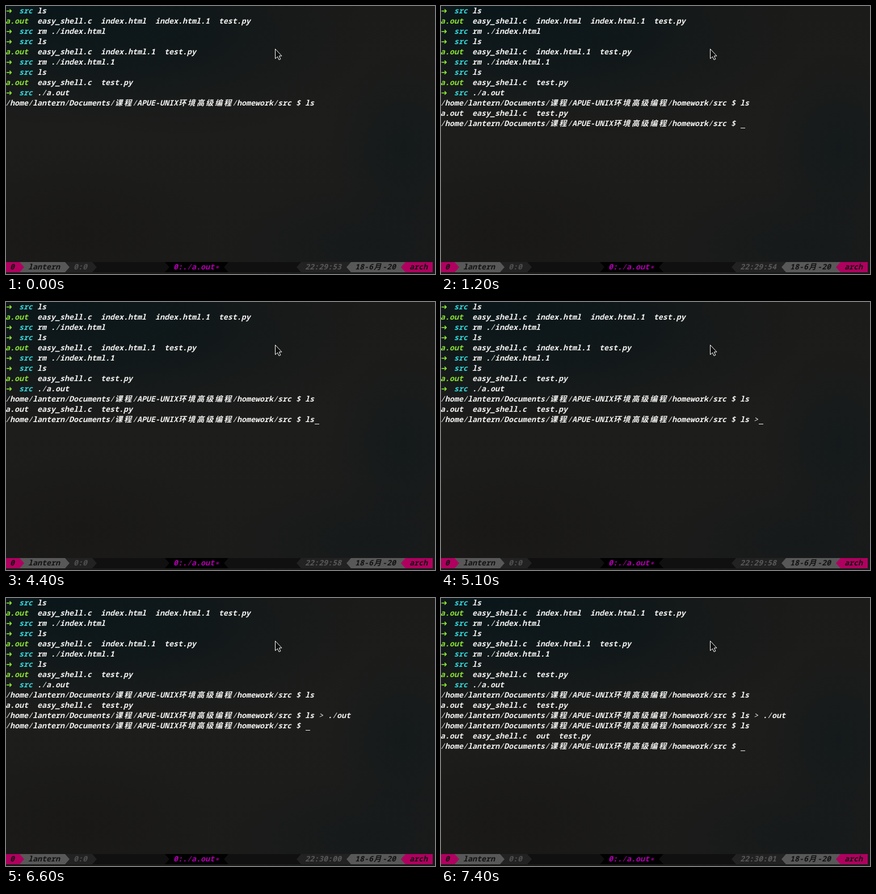
Animation, 756 px wide and 471 px high, one loop 8 s. Source, as an HTML page:

```html
<!DOCTYPE html>
<html lang="en">
<head>
<meta charset="utf-8">
<title>Terminal session</title>
<style>
  html, body { margin: 0; width: 100%; height: 100%; overflow: hidden; background: #1b1c1a; }
  body {
    background:
      radial-gradient(ellipse 380px 210px at 90px 0, #09161af0, #0b161900),
      radial-gradient(ellipse 330px 180px at 310px 50px, #0f1719c0, #0f171900),
      radial-gradient(ellipse 130px 170px at 700px 250px, #12191bd0, #12191b00),
      radial-gradient(ellipse 240px 110px at 640px 420px, #14191bc0, #14191b00),
      radial-gradient(ellipse 240px 130px at 130px 400px, #191817, #19181700),
      linear-gradient(#1b1b19, #1d1d1b 45%, #1b1b1a);
  }
  svg { display: block; width: 756px; height: 471px; }
  text {
    font: italic bold 13.3333px "Noto Sans Mono", "DejaVu Sans Mono", monospace;
    white-space: pre;
  }
  .thin { font-weight: 400; }
  .star { font-weight: 400; baseline-shift: -3px; }
  .mark { font-family: "DejaVu Sans", sans-serif; font-style: normal; }
  .han { font-family: "Noto Sans CJK SC", "Noto Sans CJK", sans-serif; }
</style>
</head>
<body>
<svg id="stage" viewBox="0 0 756 471"></svg>
<script>
const CELL = 8, LINE = 18, LOOP = 8000, PROMPT_COLS = 66;
const WHITE = '#f2f2f0', GREEN = '#8ae234', CYAN = '#34d6da';
const PINK = '#b0005f', GREY = '#585858', DARK = '#222222', BAR = '#101010', INK = '#121212';
const USER = 'lantern';
const PROMPT = `/home/${USER}/Documents/课程/APUE-UNIX环境高级编程/homework/src $ `;
const stage = document.getElementById('stage');

function add(parent, tag, attrs, content) {
  const el = document.createElementNS('http://www.w3.org/2000/svg', tag);
  for (const key in attrs) el.setAttribute(key, attrs[key]);
  if (content) el.textContent = content;
  parent.append(el);
  return el;
}

function kindOf(run) {
  if (/[一-龥]/.test(run)) return 'han';
  if (run === '➜') return 'mark';
  if (run === '*') return 'star';
  return /[\/>]/.test(run) ? 'thin' : 'latin';
}

// Sets text on the cell grid; Han characters take two cells.
// Slanted Latin leans right, so it starts one pixel early.
function put(col, row, str, fill = WHITE) {
  const text = add(stage, 'text', { y: row * LINE + 13, fill });
  for (const [run] of str.matchAll(/[一-龥]|➜|\*|[\/>]+|[^一-龥➜*\/>]+/g)) {
    const kind = kindOf(run);
    const wide = kind === 'han';
    const lean = wide || kind === 'mark' ? 0 : 1;
    add(text, 'tspan', { x: col * CELL - lean, class: kind }, run);
    col += wide ? 2 : run.length;
  }
  return text;
}

function shell(row, command) {
  put(0, row, '➜', GREEN);
  put(3, row, 'src', CYAN);
  put(7, row, command);
}

function listing(row, files) {
  put(0, row, 'a.out', GREEN);
  put(7, row, files);
}

// Status segment; l and r are the tip offsets at mid height.
function segment(x1, x2, l, r, fill) {
  const points = `${x1},450 ${x2},450 ${x2 + r},459 ${x2},468 ${x1},468 ${x1 + l},459`;
  add(stage, 'polygon', { points, fill });
}

// Earlier session
shell(0, 'ls');
listing(1, 'easy_shell.c  index.html  index.html.1  test.py');
shell(2, 'rm ./index.html');
shell(3, 'ls');
listing(4, 'easy_shell.c  index.html.1  test.py');
shell(5, 'rm ./index.html.1');
shell(6, 'ls');
listing(7, 'easy_shell.c  test.py');
shell(8, './a.out');
put(0, 9, PROMPT + 'ls');

// Status bar
segment(0, 752, 0, 0, BAR);
segment(0, 152, 0, 8, DARK);
segment(0, 104, 0, 8, GREY);
segment(0, 24, 0, 8, PINK);
segment(280, 392, 8, -8, '#000');
segment(520, 752, -8, 0, DARK);
segment(608, 752, -8, 0, GREY);
segment(704, 752, -8, 0, PINK);
put(1, 25, '0', INK);
put(5, 25, USER, INK);
put(15, 25, '0:0', '#505050');
put(37, 25, '0:./a.out*', '#b000b0');
put(77, 25, '18-6月-20', INK);
put(89, 25, 'arch', INK);
const clock = put(66, 25, '22:29:53', GREY).firstChild;

// Lines that appear later: [time, element]
const late = [
  [1200, put(0, 10, 'a.out  easy_shell.c  test.py')],
  [1200, put(0, 11, PROMPT)],
  [6600, put(0, 12, PROMPT)],
  [7400, put(0, 13, 'a.out  easy_shell.c  out  test.py')],
  [7400, put(0, 14, PROMPT)]
];

// Typed characters, each shown from its own time
const keys = [
  [11, 'ls > ./out', [4400, 4400, 4700, 5100, 5300, 5400, 5500, 6000, 6000, 6200]],
  [12, 'ls', [7100, 7300]]
].flatMap(([row, str, times]) =>
  times.map((time, i) => ({ row, time, el: put(PROMPT_COLS + i, row, str[i]) })));

const rows = [[0, 9], [1200, 11], [6600, 12], [7400, 14]];
const blinks = [200, 800, 1200, 1800, 2400, 3000, 3600];
const ticks = [400, 1400, 2400, 3500, 4400, 5400, 6400, 7400];

const caret = add(stage, 'rect', { width: CELL, height: 1, fill: WHITE });
add(stage, 'path', {
  d: 'M474.5 75.5V92.5L478.5 89L481 94.5L483.8 93.3L481.3 87.8H486Z',
  fill: '#0c0c0c', stroke: '#fff'
});

const show = (el, on) => el.setAttribute('visibility', on ? 'visible' : 'hidden');
const passed = (times, t) => times.filter(time => time <= t).length;

function draw(t) {
  for (const [time, el] of late) show(el, t >= time);
  for (const key of keys) show(key.el, t >= key.time);

  const row = rows.filter(([time]) => time <= t).pop()[1];
  const typed = row === 9 ? 2 : keys.filter(k => k.row === row && k.time <= t).length;
  caret.setAttribute('x', (PROMPT_COLS + typed) * CELL);
  caret.setAttribute('y', row * LINE + 16);
  show(caret, passed(blinks, t) % 2);

  const sec = 53 + passed(ticks, t);
  const time = `22:${29 + Math.floor(sec / 60)}:${String(sec % 60).padStart(2, '0')}`;
  if (clock.textContent !== time) clock.textContent = time;
}

const start = performance.now();
function frame() {
  draw((performance.now() - start) % LOOP);
  requestAnimationFrame(frame);
}
frame();
</script>
</body>
</html>
```
